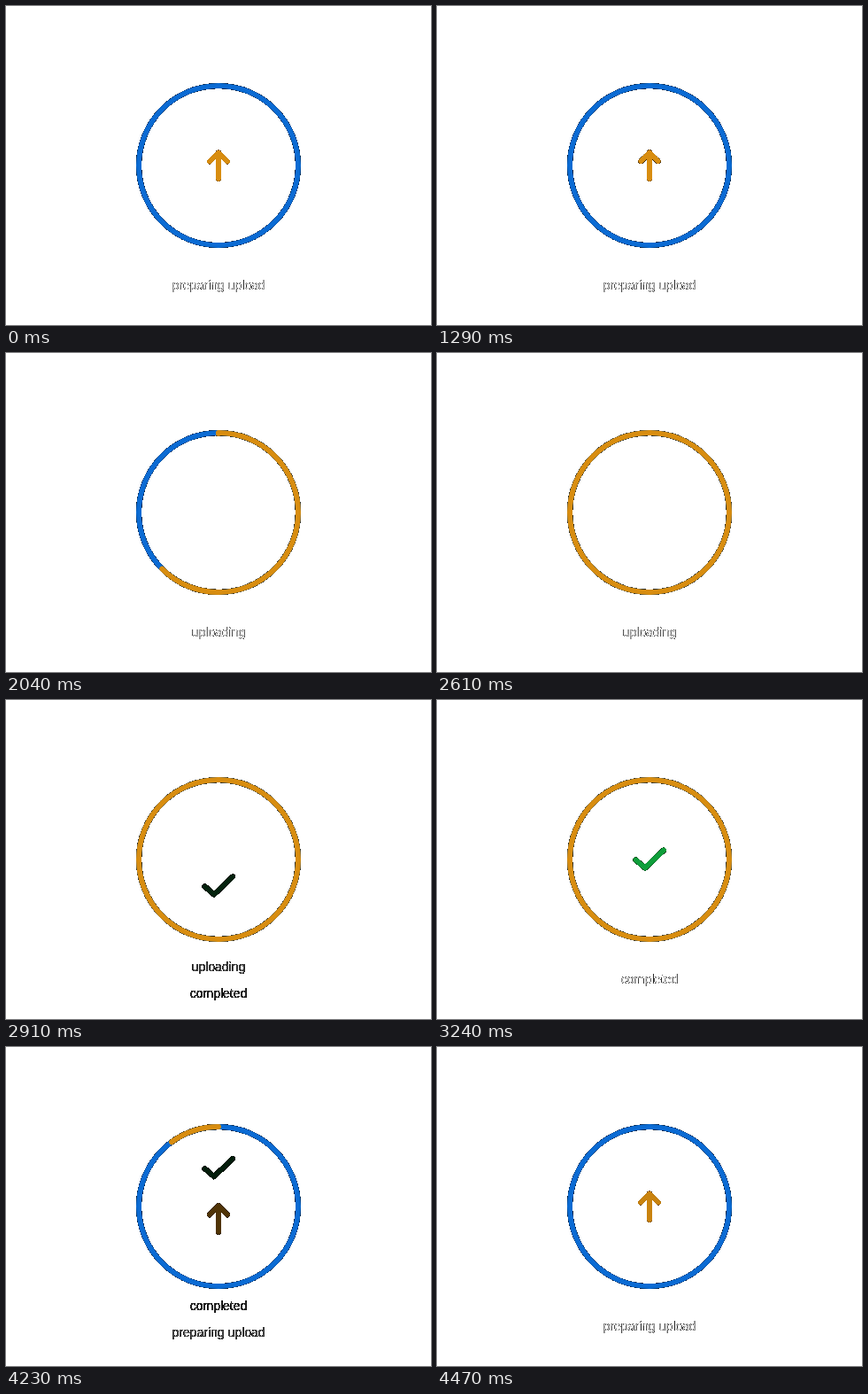
An HTML page for the animation above (4.5 s loop, 480 by 360 pixels).

```html
<!DOCTYPE html>
<html lang="en">
<head>
<meta charset="utf-8">
<title>Upload progress</title>
<style>
  html, body { margin: 0; width: 100%; height: 100%; overflow: hidden; background: #fff; }
  svg { display: block; width: 480px; height: 360px; }
  .line { fill: none; stroke-width: 6; stroke-linecap: round; stroke-linejoin: round; }
  text { font: 14px "Liberation Sans", Arial, sans-serif; text-anchor: middle; }
</style>
</head>
<body>
<svg viewBox="0 0 480 360">
  <!-- Hard-edged shapes whose soft edges blend into black -->
  <filter id="hard" filterUnits="userSpaceOnUse" x="0" y="0" width="480" height="360" color-interpolation-filters="sRGB">
    <feColorMatrix in="SourceGraphic" values="0 0 0 0 0  0 0 0 0 0  0 0 0 0 0  0 0 0 30 -6" result="mask"/>
    <feComposite in="SourceGraphic" in2="mask" operator="over"/>
    <feComposite in2="mask" operator="in"/>
  </filter>
  <filter id="halo" filterUnits="userSpaceOnUse" x="0" y="0" width="480" height="360" color-interpolation-filters="sRGB">
    <feGaussianBlur in="SourceAlpha" stdDeviation=".5"/>
    <feColorMatrix values="0 0 0 0 0  0 0 0 0 0  0 0 0 0 0  0 0 0 30 -3" result="mask"/>
    <feComposite in="SourceGraphic" in2="mask" operator="over"/>
  </filter>
  <g filter="url(#hard)">
    <circle class="line" cx="240" cy="180" r="90" stroke="#0b6bd3"/>
    <path id="trail" class="line" stroke="#d88d10" d="M240 195V90A90 90 0 0 1 240 270A90 90 0 0 1 240 90"/>
    <path id="wings" class="line" stroke="#d88d10"/>
    <path id="arrow" class="line" d="M240 195V165.500M230 175.500L240 165.500L250 175.500"/>
    <path id="check" class="line" d="M224.500 180.500L235 189.500L256 169.500"/>
  </g>
  <g filter="url(#halo)">
    <text id="preparing" x="240" y="320">preparing upload</text>
    <text id="uploading" x="240" y="320">uploading</text>
    <text id="completed" x="240" y="320">completed</text>
  </g>
</svg>
<script>
const LOOP = 4500;
const START = 1280, DONE = 2616, RESET = 3866;
const SHAFT = 105, TOTAL = SHAFT + 2 * Math.PI * 90;
const ORANGE = [216, 141, 16], GREEN = [15, 162, 60], WHITE = [255, 255, 255];

const $ = id => document.getElementById(id);
const clamp = x => Math.min(1, Math.max(0, x));
const ramp = (t, start, length) => clamp((t - start) / length);
const easeInOut = x => x < .5 ? 4 * x ** 3 : 1 - 4 * (1 - x) ** 3;
const shade = (color, a) => `rgb(${color.map(c => Math.round(c * a))})`;

// An item rises into place, waits, then rises away; its colour fades through black.
function pose(t, enter, leave, distance) {
  const inMove = easeInOut(ramp(t, enter, 600));
  const outMove = easeInOut(ramp(t, leave, 600));
  return {
    y: distance * (1 - inMove - outMove),
    alpha: Math.min(ramp(t, enter + 205, 430), 1 - ramp(t, leave, 445))
  };
}

function drawItem(id, state, color, paint) {
  const node = $(id);
  node.setAttribute("transform", `translate(0 ${state.y.toFixed(2)})`);
  node.style.visibility = state.alpha > .01 ? "visible" : "hidden";
  node.style[paint] = shade(color, state.alpha);
}

const drawText = (id, state) => drawItem(id, state, WHITE, "fill");
const drawIcon = (id, state, color) => drawItem(id, state, color, "stroke");

function drawTrail(t) {
  const head = 29.5 + (TOTAL - 29.5) * easeInOut(ramp(t, 1305, 1305));
  const tail = SHAFT * easeInOut(ramp(t, 1305, 845))
    + (TOTAL - SHAFT) * easeInOut(ramp(t, RESET, 517));
  const trail = $("trail");
  trail.style.strokeDasharray = `${Math.max(.01, head - tail)} 2000`;
  trail.style.strokeDashoffset = -Math.min(tail, TOTAL - .02);
  trail.style.visibility = t >= START ? "visible" : "hidden";

  const span = 10 * (1 - ramp(t, START, 270));
  const tip = 195 - Math.min(head, SHAFT);
  const wings = $("wings");
  wings.setAttribute("d", `M${240 - span} ${tip + span}L240 ${tip}L${240 + span} ${tip + span}`);
  wings.style.visibility = t >= START && span > 0 ? "visible" : "hidden";
}

function draw(t) {
  const early = t < RESET;
  const arrow = early ? { y: 0, alpha: t < START ? 1 : 0 } : pose(t, RESET, LOOP * 2, 57);
  drawTrail(t);
  drawIcon("arrow", arrow, ORANGE);
  drawIcon("check", pose(t, DONE, RESET, 57), GREEN);
  drawText("preparing", early ? pose(t, -LOOP, START, 30) : pose(t, RESET, LOOP * 2, 30));
  drawText("uploading", pose(t, START, DONE, 30));
  drawText("completed", pose(t, DONE, RESET, 30));
}

const begin = performance.now();
function tick() {
  draw((performance.now() - begin) % LOOP);
  requestAnimationFrame(tick);
}
tick();
</script>
</body>
</html>
```
